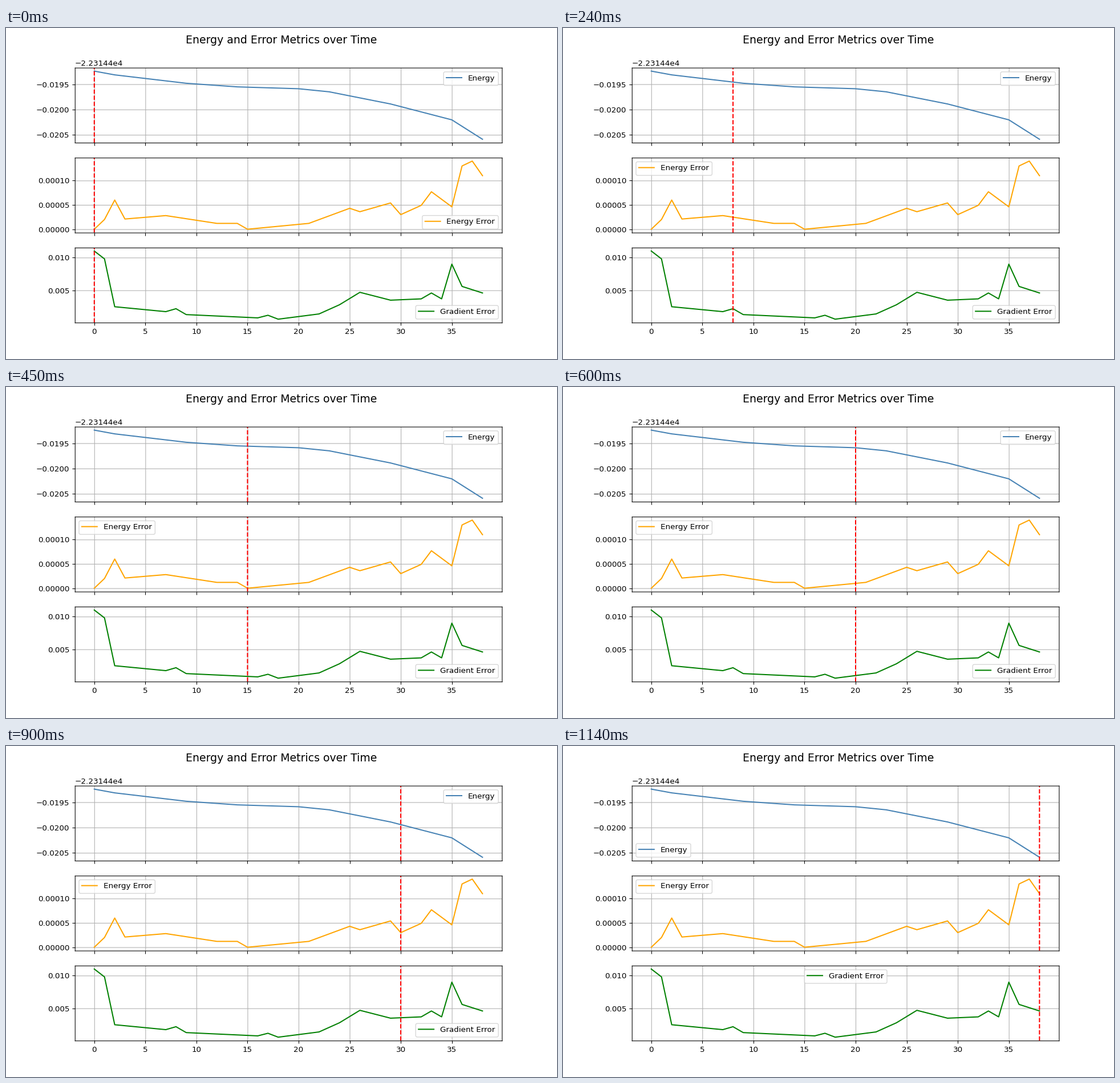
Write a matplotlib script that moves like this. It is 966 px wide and 580 px high and loops after 1.17 s.

```python
import numpy as np
import matplotlib.pyplot as plt
from matplotlib.animation import FuncAnimation
from matplotlib.patheffects import Stroke

DPI = 97
WIDTH, HEIGHT = 966, 580
INTERVAL = 30
BASE = -22314.4
STEPS = np.arange(39)


def curve(keys):
    """Straight runs between the turning points {step: value}."""
    return np.interp(STEPS, list(keys), list(keys.values()))


drop = curve({0: 41, 2: 115, 9: 281, 14: 352, 20: 389, 23: 450,
              29: 690, 35: 1004, 38: 1388})
energy_error = curve({0: 0, 1: 20, 2: 60, 3: 21, 7: 28, 12: 12, 14: 12,
                      15: 0, 21: 12, 25: 43, 26: 36, 29: 54, 30: 30,
                      32: 49, 33: 77, 35: 46, 36: 130, 37: 140, 38: 110})
gradient_error = curve({0: 110, 1: 98, 2: 25, 7: 17.5, 8: 22, 9: 13, 16: 8,
                        17: 12, 18: 6, 22: 14, 24: 28, 26: 47, 29: 35,
                        32: 37, 33: 46, 34: 37, 35: 90, 36: 56, 38: 46})

SERIES = [
    (BASE - 0.0192 - drop * 1e-6, "Energy", "steelblue"),
    (energy_error * 1e-6, "Energy Error", "orange"),
    (gradient_error * 1e-4, "Gradient Error", "green"),
]

# Soft line edges: thin lines sit half a pixel right and down, unsnapped
plt.rcParams["path.snap"] = False
half_pixel = 0.5 * 72 / DPI
nudge = [Stroke(offset=(half_pixel, -half_pixel))]

# The tiny surplus keeps the pixel size from rounding down
fig, axes = plt.subplots(
    3, 1, sharex=True, dpi=DPI,
    figsize=((WIDTH + 0.001) / DPI, (HEIGHT + 0.001) / DPI))
fig.suptitle("Energy and Error Metrics over Time", fontsize=14)

cursors = []
for ax, (values, label, color) in zip(axes, SERIES):
    ax.plot(STEPS, values, color=color, label=label)
    cursors.append(ax.axvline(0, color="red", linestyle="--"))
    ax.grid(True, path_effects=nudge)
    # "best" is worked out at each draw, so the legend dodges the cursor
    legend = ax.legend(loc="best")
    for part in [legend.get_frame(), *ax.spines.values()]:
        part.set_path_effects(nudge)
axes[0].ticklabel_format(axis="y", useOffset=BASE)


def update(step):
    for cursor in cursors:
        cursor.set_xdata([step, step])
    return cursors


anim = FuncAnimation(fig, update, frames=len(STEPS), interval=INTERVAL,
                     repeat=True, repeat_delay=0, blit=False)
plt.show()
```
